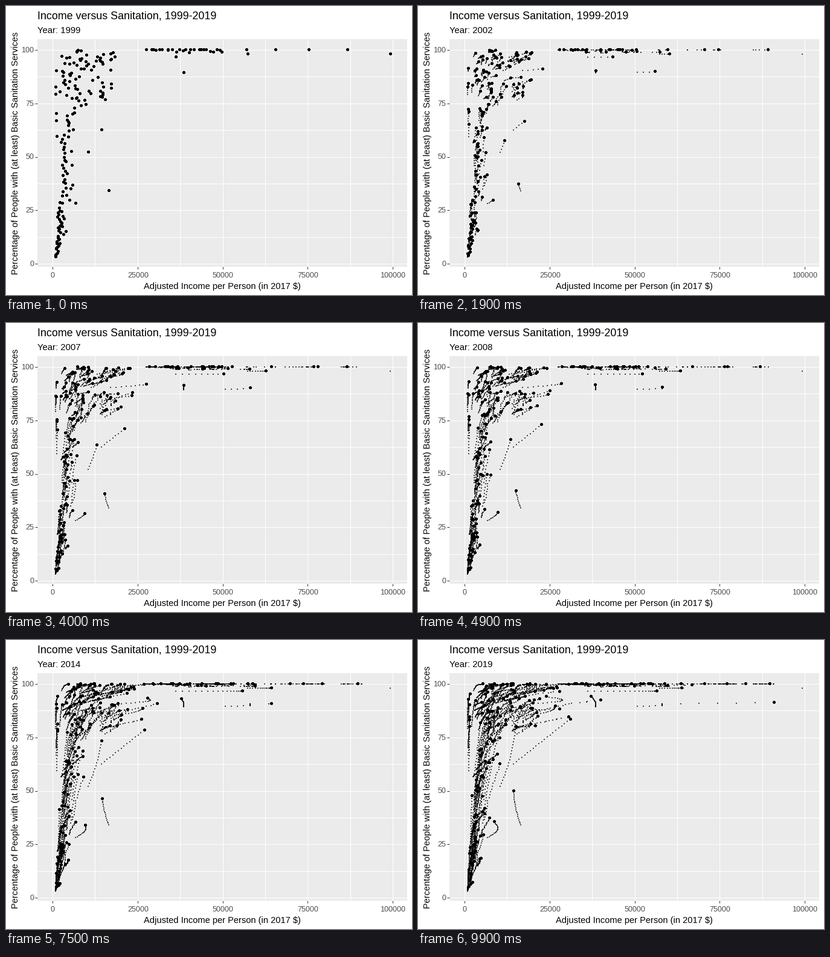
These frames come from a looping animation (672x480 px, 10 s). A matplotlib script:

```python
import matplotlib.pyplot as plt
import numpy as np
from matplotlib.animation import FuncAnimation

W, H, DPI = 672, 480, 96
FRAMES, START, SPAN = 100, 1999, 20
PX = 72 / DPI                       # one pixel in points
LEFT, RIGHT, TOP, BOTTOM = 52, 664, 55, 433
X0, Y0, SX, SY = 77, 428, 5.63, 3.55   # origin, pixels per $1000 and per percent

plt.rcParams["font.family"] = "Liberation Sans"
rng = np.random.default_rng(1999)
years = np.arange(SPAN + 1)
part = years / SPAN


# ---- data: income in $1000 and percentage for every year ----

# start income, start share, end income, end share, bow of the income path
LONERS = [
    (16.5, 34, 14.4, 50, -0.4),
    (10.5, 52, 15.1, 80, 0.7),
    (14.4, 62.6, 31, 83.5, 0),
    (6.8, 28.2, 8.7, 35.5, 2),
    (5.4, 34.9, 8.4, 64.5, -0.3),
    (17, 90.3, 24, 94, 8),
    (14.6, 84.5, 26.6, 89.7, 4),
    (38.6, 89.2, 37.2, 94.2, 0.5),
    (36.3, 96.6, 56.5, 96.6, 6),
    (57.3, 98, 63.7, 98, 3),
]


def ramp(a, b):
    return np.clip((years - a) / (b - a), 0, 1)


def steps(lo, hi, n):
    """Evenly spread values with a little jitter."""
    return lo + (hi - lo) / n * (np.arange(n) + rng.random(n))


def grow(x, lo, hi):
    """Income growing at a steady rate with a small random walk."""
    n = len(x)
    rate = np.log(rng.uniform(lo, hi, n))
    walk = np.cumsum(rng.normal(0, 0.018, (n, SPAN + 1)), axis=1)
    return x[:, None] * np.exp(rate[:, None] * part + walk - walk[:, :1])


def climb(y, lo, hi):
    """Share rising along a logistic curve."""
    gain = rng.uniform(lo, hi, len(y))
    return 100 / (1 + (100 / y - 1)[:, None] * np.exp(-gain[:, None] * part))


def typical(y, noise):
    """Usual starting income for a given share."""
    x = np.interp(y, (3, 30, 60, 70, 82), (1.2, 2.6, 4.2, 5.2, 9.5))
    return np.maximum(x * np.exp(rng.normal(0, noise, len(y))), 0.65)


def build():
    xs, ys = [], []

    def add(x, y):
        xs.append(np.atleast_2d(x))
        ys.append(np.atleast_2d(y))

    for x0, y0, x1, y1, bow in LONERS:
        add(x0 + (x1 - x0) * part + bow * np.sin(np.pi * part),
            y0 + (y1 - y0) * part)

    # joins a year late, then booms near the end
    add(np.where(years > 0, 49 + 9 * ramp(0, 5) + 33 * ramp(14, 20), np.nan),
        89.4 + 1.9 * part)
    # present in the first year only
    add(np.where(years == 0, 99.3, np.nan), 97.9 + 0 * part)

    # richest
    top = grow(57 * 1.15 ** np.arange(4), 1.05, 1.2)
    add(np.minimum(top, 99), np.full_like(top, 100))
    # wealthy
    n = 25
    gap = np.minimum(rng.exponential(0.55, n), 2.5) * (rng.random(n) < 0.6)
    add(grow(steps(27.5, 50.5, n), 1.0, 1.3), 100 - gap[:, None] * (1 - 0.2 * part))
    # middle incomes
    n = 46
    add(grow(2 + 16 * rng.random(n) ** 1.25, 1.2, 2.1), climb(steps(76, 97, n), 0, 1.4))
    # middle incomes close to full cover
    n = 20
    add(grow(2.2 + 18 * rng.random(n) ** 1.2, 1.2, 2.1), climb(steps(93, 99.9, n), 0.5, 4))
    # rising
    y = steps(26, 82, 48)
    add(grow(typical(y, 0.25), 1.2, 2.1), climb(y, 0.1, 1.4))
    # poor
    y = steps(3, 25, 35)
    add(grow(typical(y, 0.36), 1.0, 1.9), climb(y, 0.1, 1.3))
    # poor but well served
    add(grow(rng.uniform(0.95, 1.35, 6), 1.0, 1.7), climb(steps(58, 94, 6), -0.1, 1.3))
    return np.vstack(xs), np.vstack(ys)


income, share = build()


# ---- stage ----

fig = plt.figure(figsize=(W / DPI, H / DPI), dpi=DPI, facecolor="white")
ax = fig.add_axes([LEFT / W, 1 - BOTTOM / H, (RIGHT - LEFT) / W, (BOTTOM - TOP) / H],
                  facecolor="#EBEBEB")
ax.set_xlim((LEFT - X0) / SX, (RIGHT - X0) / SX)
ax.set_ylim((Y0 - BOTTOM) / SY, (Y0 - TOP) / SY)
ax.spines[:].set_visible(False)

for v in np.arange(0, 101, 12.5):
    ax.axvline(v, color="white", lw=PX, zorder=1)
    ax.axhline(v, color="white", lw=PX, zorder=1)

ticks = range(0, 101, 25)
ax.set_xticks(ticks, [])
ax.set_yticks(ticks, [])
ax.tick_params(length=3.67 * PX, width=PX, color="#333333")


def put(x, y, s, px, color="black", **kw):
    return fig.text(x / W, 1 - y / H, s, fontsize=px * PX, color=color, **kw)


put(51.5, 22, "Income versus Sanitation, 1999-2019", 17.85)
subtitle = put(52, 45, "", 14.8)
put(358, 470, "Adjusted Income per Person (in 2017 $)", 14.6, ha="center")
put(23.5, 244, "Percentage of People with (at least) Basic Sanitation Services", 14.63,
    rotation=90, ha="right", va="center")
for v in ticks:
    put(X0 + 0.5 + SX * v, 451, str(v * 1000), 12.5, "#4D4D4D", ha="center")
    put(46.5, Y0 - SY * v + 4, str(v), 12.5, "#4D4D4D", ha="right")

# a crisp disc five pixels wide: a square with its corner pixels cut
DISC = [(-1, -2), (2, -2), (2, -1), (3, -1), (3, 2), (2, 2), (2, 3), (-1, 3),
        (-1, 2), (-2, 2), (-2, -1), (-1, -1), (-1, -2)]
trail, = ax.plot([], [], "s", ms=2 * PX, mew=0, color="black", alpha=0.68, zorder=3)
dots, = ax.plot([], [], ls="", marker=DISC, ms=6 * PX, mew=0, color="black", zorder=4)


def at(series, t):
    k = int(t)
    f = t - k
    return series[:, k] if f == 0 else series[:, k] * (1 - f) + series[:, k + 1] * f


def draw(i):
    t = SPAN * i / (FRAMES - 1)
    past = int(np.ceil(t))
    trail.set_data(income[:, :past].ravel(), share[:, :past].ravel())
    dots.set_data(at(income, t), at(share, t))
    subtitle.set_text(f"Year: {START + int(t)}")
    return trail, dots, subtitle


anim = FuncAnimation(fig, draw, frames=FRAMES, interval=100, repeat=True,
                     repeat_delay=0, init_func=lambda: draw(0))
plt.show()
```
